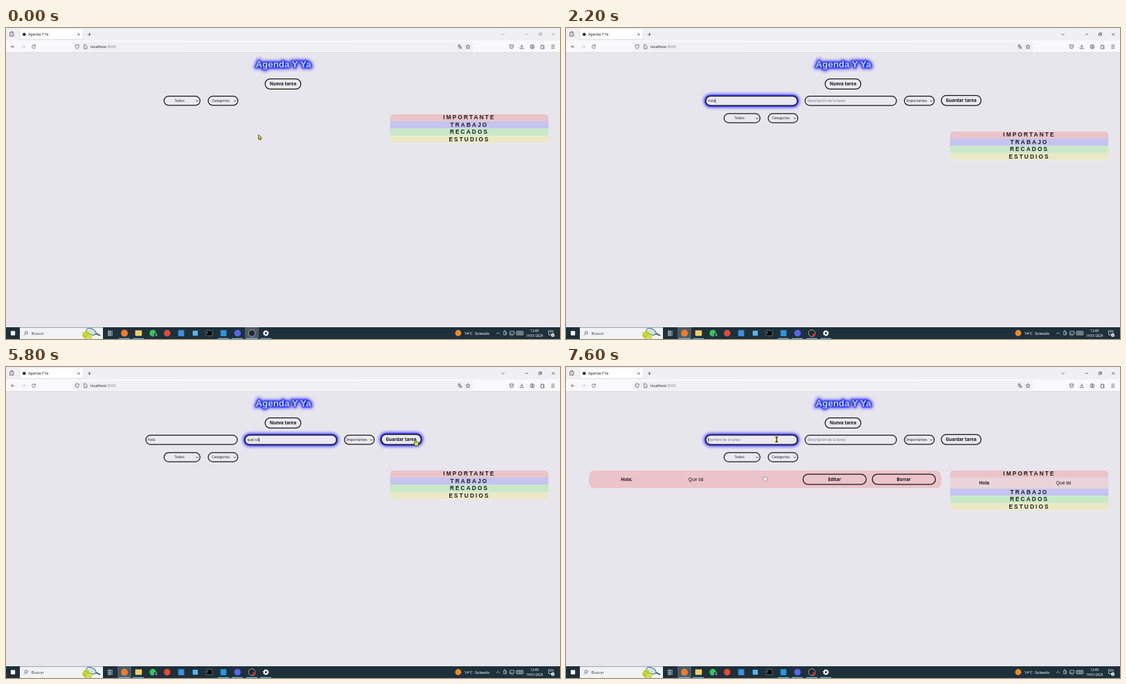
An HTML page for the animation above (8000 ms loop, 800 by 450 pixels).

```html
<!DOCTYPE html>
<html lang="es">
<head>
<meta charset="utf-8">
<title>Agenda Y Ya</title>
<style>
html, body { margin: 0; width: 100%; height: 100%; overflow: hidden; background: #e8e6ed; }
svg { display: block; width: 800px; height: 450px; }
text { font-family: "Noto Sans", "Open Sans", sans-serif; font-size: 5.1px; fill: #222; white-space: pre; }
.mid { text-anchor: middle; }
.btn { font-size: 6.3px; font-weight: 700; fill: #151518; text-anchor: middle; }
.arial { font-family: "Liberation Sans", Arial, sans-serif; font-size: 6.67px; fill: #1c1c20; text-anchor: middle; }
.bold { font-weight: 700; }
.legend { font-size: 8.33px; font-weight: 700; letter-spacing: 2.083px; }
.title { font-size: 13.33px; font-weight: 700; fill: #b4dcff; }
.hint { fill: #77767e; }
.bar { fill: #f2f4f6; }
.line { fill: none; stroke: #4a4a52; stroke-width: .75; }
.tray { fill: none; stroke: #e6eaec; stroke-width: .7; }
</style>
</head>
<body>
<svg id="stage" viewBox="0 0 800 450" xmlns="http://www.w3.org/2000/svg"></svg>
<script>
const LOOP = 8000, STEP = 200, FORM_SHIFT = 25.2;
const INK = '#17171b', PINK = '#eac4c8';

const rect = (x, y, w, h, fill, r = 0, extra = '') =>
  `<rect x="${x}" y="${y}" width="${w}" height="${h}" rx="${r}" fill="${fill}" ${extra}/>`;
const dot = (x, y, r, fill, extra = '') => `<circle cx="${x}" cy="${y}" r="${r}" fill="${fill}" ${extra}/>`;
const text = (x, y, str, cls = '', extra = '') => `<text x="${x}" y="${y}" class="${cls}" ${extra}>${str}</text>`;
const line = (d, cls = 'line', extra = '') => `<path d="${d}" class="${cls}" ${extra}/>`;
const group = (id, body, extra = '') => `<g id="${id}" ${extra}>${body}</g>`;

// Rounded outlined control; with an id it also gets a blue glow behind it.
function pill(x, y, w, h, glowId = '', fill = '#eae9ef') {
  const glow = glowId && group(glowId,
    rect(x - 2.2, y - 2.2, w + 4.4, h + 4.4, '#1212ff', h / 2 + 2, 'filter="url(#blur)"') +
    rect(x - .8, y - .8, w + 1.6, h + 1.6, '#1010e8', h / 2, 'filter="url(#soft)"'));
  return glow + rect(x, y, w, h, fill, h / 2, `stroke="${INK}" stroke-width="1.25"`);
}
const select = (x, y, w, label, labelX) => pill(x, y, w, 13.2) +
  text(labelX, y + 8.6, label, 'mid') +
  line(`M${x + w - 6} ${y + 6} l1.7 1.7 l1.7 -1.7`, 'line', 'style="stroke:#222;stroke-width:.9"');

function browser() {
  const controls = line('M715.5 8 l2.2 2.2 l2.2 -2.2') +
    line('M750 9.2 h4') +
    line('M769.3 8 h3 v3 h-3 z M770.4 8 v-1 h3 v3 h-1') +
    line('M788.3 7.2 l4 4 m0 -4 l-4 4');
  return rect(0, 0, 800, 18, '#f0f0f4') + rect(0, 18, 800, 17.5, '#f9f9fb') +
    rect(0, 35, 800, .7, '#d3d2da') +
    rect(19.5, 2, 92.5, 15, '#c9c8d2', 2) + rect(20, 1.8, 91.5, 14.6, '#fff', 2) +
    dot(26.3, 9.2, 2.3, '#2b2b2e') +
    text(32, 11.1, 'Agenda Y Ya') +
    line('M5.5 6.8 h5.4 v5 h-5.4 z M6.4 5.4 h3.6 M7 9.3 l1.2 1 l1.2 -1') +
    line('M103.3 7.6 l3.4 3.4 m0 -3.4 l-3.4 3.4 M118 9.3 h5 m-2.5 -2.5 v5') +
    group('controls', controls) +
    line('M12.6 27 h-5 m2.2 -2.2 l-2.2 2.2 l2.2 2.2') +
    line('M22.4 27 h5 m-2.2 -2.2 l2.2 2.2 l-2.2 2.2', 'line', 'opacity=".35"') +
    line('M42 25.6 a2.4 2.4 0 1 0 .4 2 M42.4 24.2 v1.8 h-1.8') +
    rect(97, 20.3, 577, 13.4, '#f0f0f4', 1.8) +
    line('M102.8 24 l2.5 .9 l-.2 2.6 q-.5 1.6 -2.3 2.6 q-1.8 -1 -2.3 -2.6 l-.2 -2.6 z') +
    line('M112.8 24.2 h2.4 l1.6 1.6 v4 h-4 z') +
    `<text x="122" y="28.9" style="font-size:5.4px">localhost<tspan fill="#86868e">:3000</tspan></text>` +
    line('M652.4 24.8 h4 m-2 -1 v1 m1.2 0 q-.8 2.2 -3 3 m.6 -2.2 q.8 1.4 2 2 M655 30 l1.6 -3.6 l1.7 3.6 m-2.8 -1 h2.2') +
    line('M667 24 l.9 2 l2.2 .2 l-1.7 1.5 l.5 2.2 l-1.9 -1.2 l-1.9 1.2 l.5 -2.2 l-1.7 -1.5 l2.2 -.2 z') +
    line('M727.6 24.6 h5 v2.6 a2.5 2.5 0 0 1 -5 0 z M728.9 26.4 l1.2 1.2 l1.2 -1.2') +
    line('M744.8 24 v3.8 m-1.8 -1.7 l1.8 1.8 l1.8 -1.8 M742.4 28.4 v1.3 h4.8 v-1.3') +
    dot(760, 27, 2.9, 'none', 'class="line"') + dot(760, 26.2, 1, '#4a4a52') + line('M758.2 28.9 q1.8 -1.6 3.6 0') +
    line('M772.4 25.6 h1.4 v-1 h1.4 v1 h1.8 v1.6 h-1 v1.2 h1 v1.6 h-4.6 z') +
    line('M787.4 24.8 h4.8 m-4.8 2.2 h4.8 m-4.8 2.2 h4.8');
}

function header() {
  const title = extra => text(400.5, 56.8, 'Agenda Y Ya', 'arial title', extra);
  const halo = 'fill="#2020ff" stroke="#2424ff" style="fill:#2424ff"';
  return title(`${halo} stroke-width="4" filter="url(#blur)"`) +
    title(`${halo} stroke-width="1.6" filter="url(#soft)"`) + title() +
    pill(374.2, 73.6, 51.6, 14.8, 'glowNew') + text(400, 83.3, 'Nueva tarea', 'btn');
}

const form = () => group('form',
  pill(202, 98.7, 132, 13.4, 'glowName') + text(205, 107.4, '', '', 'id="name"') +
  pill(345.2, 98.7, 132, 13.4, 'glowDesc') + text(348.6, 107.4, '', '', 'id="desc"') +
  rect(0, 102.2, .6, 6.4, '#111', 0, 'id="caret"') +
  select(488.7, 98.7, 43, 'Importantes', 506.5) +
  pill(542, 97.5, 57.4, 14.6, 'glowSave') + text(570.7, 107.2, 'Guardar tarea', 'btn'));

function lists() {
  const rows = [['TRABAJO', '#c4c4f0'], ['RECADOS', '#c8e9c8'], ['ESTUDIOS', '#ebe9c5']];
  const row = (name, fill, y) => rect(554.5, y, 229, 10.5, fill) + text(669, y + 7.9, name, 'arial legend');
  const card = rect(33.2, 124.6, 508.8, 25.5, PINK, 8) +
    text(87.5, 139.6, 'Hola:', 'arial bold') + text(187.6, 139.6, 'Que tal', 'arial') +
    rect(285.1, 134.6, 5.2, 5.2, '#fff', .8, 'stroke="#77767c" stroke-width=".7"') +
    pill(342.3, 129.9, 91.2, 14.8, '', PINK) + text(387.8, 139.6, 'Editar', 'btn') +
    pill(442.3, 129.9, 91.2, 14.8, '', PINK) + text(487.8, 139.6, 'Borrar', 'btn');
  const entry = rect(554.5, 134.8, 229, 15.9, '#e9d4d9') +
    text(604, 144.7, 'Hola', 'arial bold') + text(718.5, 144.7, 'Que tal', 'arial');
  return group('lower',
    select(228.2, 98.7, 52, 'Todos', 250.5) + select(292, 98.7, 42.8, 'Categorias', 310) +
    group('card', card) +
    `<clipPath id="round"><rect id="frame" x="554.5" y="124.4" width="229" height="42" rx="6"/></clipPath>` +
    `<g clip-path="url(#round)">${row('IMPORTANTE', PINK, 124.4)}${group('entry', entry)}` +
    group('rest', rows.map(([name, fill], i) => row(name, fill, 134.8 + i * 10.4)).join('')) + '</g>');
}

function taskbar() {
  const y = 441.6;
  const square = (x, fill, s = 8.6) => rect(x - s / 2, y - s / 2, s, s, fill, .8);
  const open = [171, 191, 314, 334, 355, 375]
    .map(x => rect(x - 8, 448.8, 16, 1.2, '#76b9ed')).join('');
  const gear = dot(375.3, y, 2.5, 'none', 'stroke="#fff" stroke-width="1.8"') +
    dot(375.3, y, 3.7, 'none', 'stroke="#fff" stroke-width="1.3" stroke-dasharray="1.45 1.45"');
  const strings = [0, 1, 2, 3].map(i => `M${120.5 + i * 2} 436.5 l3.4 6.4`).join('');
  return rect(0, 433, 800, 17, '#1d303b') +
    square(10, '#fff', 6.2) +
    rect(20, 433.4, 120, 16.6, '#f1f2f3') +
    dot(29.4, 440.8, 2, 'none', 'class="line"') + line('M28 442.4 l-2.2 2.4') +
    text(36.7, 443.8, 'Buscar', '', 'style="font-size:5.7px;fill:#444"') +
    `<ellipse cx="123" cy="439.4" rx="7.5" ry="4.2" transform="rotate(22 123 439.4)" fill="#e4eef2" stroke="#2b6c8c" stroke-width="1"/>` +
    line(strings, 'line', 'style="stroke:#8db3c4;stroke-width:.5"') +
    line('M129.5 442 l6.5 3', 'line', 'style="stroke:#344a57;stroke-width:1.8"') +
    dot(116, 444, 5.8, '#b9cf2c') + dot(121.5, 447, 3.2, '#d3df54') +
    line('M111.5 441 q5 1 6.4 8', 'line', 'style="stroke:#eff5c0"') +
    line('M147.5 438.3 h4 v1.4 h-4 z M147.5 441 h4 v1.6 h-4 z M147.5 444 h4 v1.2 h-4 z M153.2 438 v7.4', 'tray') +
    group('activeWeb', rect(161, 433, 20, 17, '#4a5b64')) +
    group('activeRec', rect(345, 433, 20, 17, '#4a5b64')) + open +
    dot(171, y, 5, '#f47a2b') + rect(186.6, 437.6, 9.6, 7.8, '#f5cf62', .8) +
    dot(212, y, 4.8, '#35c25a') + dot(216.8, 444.6, 3.1, '#26343c') +
    text(216.8, 446.4, '4', 'mid', 'style="fill:#fff"') +
    dot(232.7, y, 4.8, '#e2493b') + square(253, '#3e8fe0') + square(273.3, '#5db4e8', 7.4) +
    rect(288.8, 437.7, 9.2, 7.6, '#080a0c', .3, 'stroke="#a8afb4" stroke-width=".5"') +
    line('M290.2 439.8 l1.2 1 l-1.2 1', 'tray') +
    square(314, '#2c94dc') + dot(334.3, y, 4.8, '#5865f2') +
    dot(355, y, 4.8, '#24262a', 'stroke="#d5d8da" stroke-width=".7"') +
    group('recording', dot(357.8, 444.4, 2.3, '#e5262b')) + gear +
    dot(653, 441.5, 4.4, '#f08a24') +
    text(661.5, 443.7, '14°C', '', 'style="font-size:5.6px;fill:#fff"') +
    text(677, 443.7, 'Soleado', '', 'style="font-size:5.6px;fill:#fff"') +
    line('M708.2 442.8 l2.3 -2.3 l2.3 2.3', 'tray') +
    line('M718.8 439 h3 v5 h-3 z M722.6 440 v3.4 M719.4 437.8 h1.8', 'tray') +
    line('M727.8 439 h6 v4 h-6 z M729.6 445 h2.6 M728 445 v-3', 'tray') +
    line('M737.2 439 h9.4 v5 h-9.4 z M738.5 440.6 h7 M738.5 442.4 h7', 'tray') +
    text(763.2, 439.6, '12:49', 'mid', 'style="font-size:4.7px;fill:#fff"') +
    text(763.2, 447.4, '14/01/2024', 'mid', 'style="font-size:4.6px;fill:#fff"') +
    line('M783.4 438 h6.6 v5.4 h-4 l-1.4 1.5 v-1.5 h-1.2 z M784.8 440 h3.8', 'tray') +
    dot(789.6, 444.6, 2.5, '#e8ecee') + text(789.6, 446, '2', 'mid', 'style="font-size:4px"');
}

const cursors = group('arrow', '<path d="M0 0 L0 6.6 L1.6 5.3 L2.7 7.7 L4 7.1 L2.9 4.9 L4.9 4.6 Z" fill="#cfe62a" stroke="#26290f" stroke-width=".7"/>') +
  group('hand', '<path d="M-.9 .6 q.9 -1.2 1.8 0 v2.6 q2.6 .1 3.6 1 q.5 2.6 -1 4.8 h-3.8 l-2.4 -3.4 q.2 -1.2 1.8 -.4 z" fill="#cfe62a" stroke="#26290f" stroke-width=".7"/>') +
  group('beam', '<path d="M-2 -3.4 h4 M0 -3.4 v6.8 M-2 3.4 h4" fill="none" stroke="#c8bb3a" stroke-width="2"/><path d="M-1.8 -3.4 h3.6 M0 -3.4 v6.8 M-1.8 3.4 h3.6" fill="none" stroke="#24220c" stroke-width="1"/>');

document.getElementById('stage').innerHTML =
  `<defs><filter id="blur" x="-50%" y="-150%" width="200%" height="400%"><feGaussianBlur stdDeviation="2.6"/></filter>
   <filter id="soft" x="-50%" y="-150%" width="200%" height="400%"><feGaussianBlur stdDeviation="1.1"/></filter></defs>` +
  rect(0, 0, 800, 450, '#e8e6ed') + browser() + header() + form() + lists() + taskbar() + group('pointer', cursors);

const $ = id => document.getElementById(id);
const show = (id, on) => $(id).setAttribute('display', on ? 'inline' : 'none');
const shift = (id, x, y) => $(id).setAttribute('transform', `translate(${x} ${y})`);

// Each step changes only the listed parts of the state.
const steps = [
  [0, { shape: 'arrow', at: [364.6, 154.6], hover: '', focus: '', open: false, saved: false, active: false, name: '', desc: '' }],
  [200, { at: [368, 146] }],
  [400, { at: [384, 112] }],
  [600, { at: [397, 82], shape: 'hand', hover: 'New' }],
  [800, { open: true, active: true }],
  [1000, { at: [345, 94], shape: 'arrow', hover: '' }],
  [1200, { at: [299.8, 101.4], shape: 'beam', focus: 'Name' }],
  [1600, { name: 'h', shape: '' }],
  [1800, { name: 'ho' }],
  [2000, { name: 'hol' }],
  [2200, { name: 'hola' }],
  [2600, { focus: 'Desc' }],
  [3600, { desc: 'q' }],
  [3800, { desc: 'qu' }],
  [4000, { desc: 'que' }],
  [4200, { desc: 'que ' }],
  [4400, { desc: 'que t' }],
  [4600, { desc: 'que ta' }],
  [4800, { desc: 'que tal' }],
  [5400, { at: [455, 104], shape: 'beam' }],
  [5600, { at: [568, 105], shape: 'hand', hover: 'Save' }],
  [5800, { at: [591.2, 105] }],
  [6000, { at: [588, 105], shape: 'arrow', hover: '', focus: '', open: false, saved: true, name: '', desc: '' }],
  [6200, { at: [500, 97] }],
  [6400, { at: [418, 90] }],
  [6600, { at: [392.8, 81.6], shape: 'hand', hover: 'New' }],
  [7000, { open: true }],
  [7200, { at: [368, 92], shape: 'arrow', hover: '' }],
  [7400, { at: [318, 103], shape: 'beam' }],
  [7600, { at: [304.2, 104.8], focus: 'Name' }]
];

function stateAt(t) {
  return Object.assign({}, ...steps.filter(([start]) => start <= t).map(([, part]) => part));
}

function setField(id, value, hint) {
  $(id).textContent = value || hint;
  $(id).setAttribute('class', value ? '' : 'hint');
}

function placeCaret(s) {
  const field = s.focus.toLowerCase();
  show('caret', field);
  if (!field) return;
  const el = $(field), typed = s[field].length;
  const width = typed ? el.getSubStringLength(0, typed) : 0;
  $('caret').setAttribute('x', +el.getAttribute('x') + width + .2);
}

function draw(t) {
  const s = stateAt(t);
  show('form', s.open);
  shift('lower', 0, s.open ? FORM_SHIFT : 0);
  show('card', s.saved);
  show('entry', s.saved);
  shift('rest', 0, s.saved ? 15.9 : 0);
  $('frame').setAttribute('height', s.saved ? 57.9 : 42);
  setField('name', s.name, 'Nombre de la tarea');
  setField('desc', s.desc, 'Descripción de la tarea');
  for (const key of ['New', 'Name', 'Desc', 'Save']) show('glow' + key, s.hover === key || s.focus === key);
  placeCaret(s);
  $('controls').setAttribute('opacity', s.active ? 1 : .45);
  show('activeWeb', s.active);
  show('activeRec', !s.active);
  show('recording', s.active);
  for (const shape of ['arrow', 'hand', 'beam']) show(shape, s.shape === shape);
  shift('pointer', ...s.at);
}

const begin = performance.now();
let last = -1;
function tick() {
  const t = Math.floor((performance.now() - begin) % LOOP / STEP) * STEP;
  if (t !== last) draw(last = t);
  requestAnimationFrame(tick);
}
tick();
</script>
</body>
</html>
```
